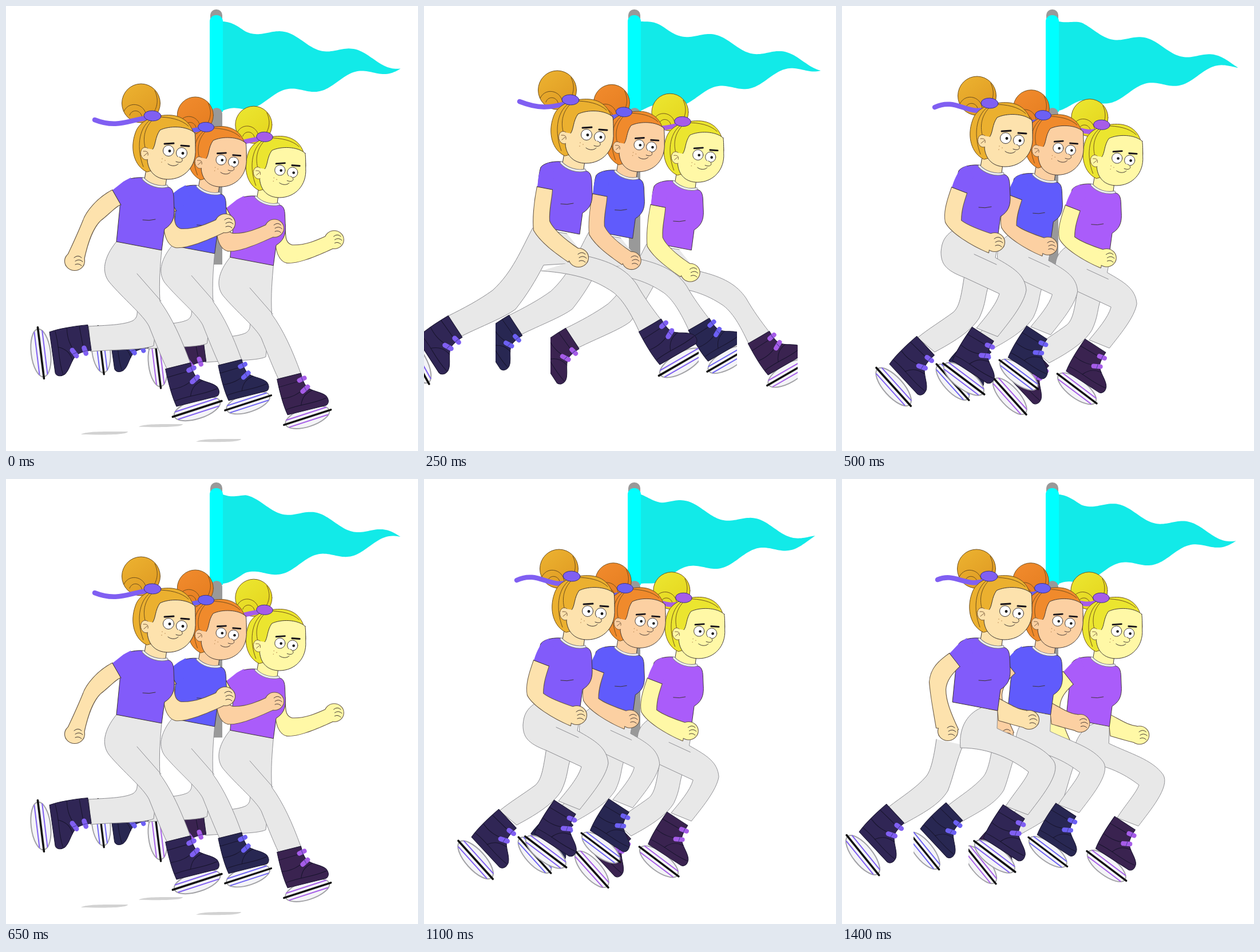
Recreate the animation shown at these times as an HTML page with a canvas. Size 720 px wide and 778 px high, loop 1450 ms.

```html
<!DOCTYPE html>
<html>
<head>
<meta charset="utf-8">
<style>
html, body { margin: 0; width: 100%; height: 100%; overflow: hidden; background: #fff; }
canvas { display: block; }
</style>
</head>
<body>
<canvas id="stage" width="720" height="778"></canvas>
<script>
const ctx = document.getElementById('stage').getContext('2d');
const LOOP = 1450, TICK = 50, TAU = Math.PI * 2;
const INK = '#3b3330', GREY = '#8c8c90', PANTS = '#e8e8e8';

// Legs: path plus boot [heel x, heel y, degrees, skate drop, skate tilt]
const contact = {
  back: 'M145 560C175 558 205 558 222 550C229 545 230 540 229 528L262 560L258 594C240 602 190 600 148 604Z',
  backBoot: [76, 570, 82, 4, 1],
  front: 'M193 412C170 440 167 465 180 482C205 512 240 540 250 560C262 590 272 615 281 634L322 624C306 580 290 545 269 516C267 480 270 450 272 427Z',
  frontBoot: [298, 700, -14, -3, -4],
  crease: 'M229 468L271 516', shadow: true
};
const push = {
  back: 'M165 455C160 490 155 510 147 520C130 540 105 555 82 573L108 603C140 585 170 570 185 545C195 520 200 490 212 465',
  backBoot: [30, 617, 47, 7, 4],
  front: 'M272 406L271 436C310 455 350 465 370 493C384 515 345 560 325 587L286 572C300 550 322 525 326 512C300 492 260 470 207 470C204 440 215 412 243 400',
  frontBoot: [247, 628, 33, 0, 4]
};
const leap = {
  back: 'M250 398L190 388C170 425 155 465 120 497C95 515 70 528 42 542L66 577C100 560 140 545 160 530C180 505 195 480 209 453L290 448',
  backBoot: [-13, 581, 57, 6, 4],
  front: 'M288 438C330 448 355 462 372 487C385 510 400 530 413 547L377 571C365 545 350 515 330 500C300 480 270 468 205 463',
  frontBoot: [412, 627, -30, 0, 0]
};
const pass = {
  back: 'M214 470C208 510 205 525 195 535C175 550 150 565 132 580L162 605C190 590 225 570 240 545C252 520 250 505 256 490Z',
  backBoot: [83, 626, 47, 6, 1],
  front: 'M193 393C180 402 174 412 173 430C173 450 180 462 215 475L275 503C270 522 250 545 235 563L272 578C290 555 318 522 322 497C320 470 300 458 268 440L275 403Z',
  frontBoot: [193, 620, 33, 0, 4],
  crease: 'M231 434L270 452'
};

// Arms: outline, fist centre; sleeves: cuff edge plus the rest
const armBack = { path: 'M186 322C160 335 140 360 135 375C125 400 113 425 106 440L136 444C145 402 155 385 165 375C178 365 192 350 200 347Z', fist: [120, 446] };
const armFront = { path: 'M293 352C294 372 292 386 306 390C330 391 350 382 370 373L380 396C345 412 315 424 296 422C282 418 277 400 276 385Z', fist: [383, 380] };
const armLow = { path: 'M188 305C170 318 155 330 153 355C155 380 160 405 165 435L203 438C190 410 181 388 181 368C182 352 192 340 206 327Z', fist: [185, 441] };
const armLowFar = { path: 'M270 382C295 395 305 403 322 405L322 435C300 430 285 425 274 422Z', fist: [327, 421] };
const slant = ['M186 322L201 348', 'L228 328L218 300L205 307Z'];
const slantUp = ['M188 305L206 328', 'L230 308L218 278L205 287Z'];

const POSES = [
  { legs: contact, head: [0, 0], bun: [0, 0], near: armBack, far: armFront, sleeve: slant,
    ribbon: 'M246 196C218 198 195 215 155 199' },
  { legs: push, head: [1, -22], bun: [-2, 9], near: armLow, far: armLowFar, sleeve: slantUp,
    ribbon: 'M250 178C215 190 198 163 167 176' },
  { legs: leap, head: [0, -28], bun: [-3, 5],
    near: { path: 'M198 316C192 345 190 375 192 392C205 415 235 435 252 447L269 424C245 408 225 390 219 376C218 355 223 338 224 321Z', fist: [270, 440] },
    sleeve: ['M198 316L224 321', 'L228 292L218 274L208 279C199 290 200 305 198 316Z'],
    ribbon: 'M246 171C220 178 200 180 167 167' },
  { legs: contact, head: [0, 0], bun: [0, 0], farBack: armBack,
    near: { path: 'M206 345C209 375 215 395 226 408C250 425 320 415 364 399L358 376C325 388 270 392 252 385C242 375 238 355 238 342Z', fist: [371, 385] },
    sleeve: ['M206 348L238 344', 'L236 315L218 301L207 307C200 320 202 336 206 348Z'],
    ribbon: 'M246 196C218 198 195 215 155 199' },
  { legs: pass, head: [2, -22], bun: [-2, 9],
    near: { path: 'M192 317C182 345 178 362 181 378C190 396 225 418 256 431L262 399C238 391 218 383 208 375C208 355 214 340 218 327Z', fist: [267, 413] },
    sleeve: ['M192 317L218 327', 'L230 298L218 279L207 285C198 298 194 310 192 317Z'],
    ribbon: 'M250 181C218 190 198 160 162 177' },
  { legs: leap, head: [0, -28], bun: [-3, 5], near: armLow, far: armLowFar, sleeve: slantUp,
    ribbon: 'M246 171C220 178 200 180 167 167' }
];

const RUNNERS = [
  { at: [207, 45], scale: .957, clip: [221, 653], skin: '#fff8a6', hair: '#ebe52f', bun: '#e5d51d', shirt: '#aa5cfa', lace: '#a65ce8', boot: '#3a2350' },
  { at: [108.7, 31], scale: .941, clip: [125, 547], skin: '#fcd0a2', hair: '#f08a2c', bun: '#e57d20', shirt: '#605bfc', lace: '#6c60f4', boot: '#282752' },
  { at: [0, 0], scale: 1, clip: [0, 480], skin: '#fde2ad', hair: '#ebb02f', bun: '#df9a22', shirt: '#825bfa', lace: '#805ff2', boot: '#302655' }
];

const asPath = p => typeof p === 'string' ? new Path2D(p) : p;

function line(p, color = INK, width = 1) {
  ctx.strokeStyle = color;
  ctx.lineWidth = width;
  ctx.stroke(asPath(p));
}

function shape(p, fill, edge = INK, width = 1) {
  p = asPath(p);
  ctx.fillStyle = fill;
  ctx.fill(p);
  if (edge) line(p, edge, width);
}

function oval(x, y, rx, ry = rx, turn = 0) {
  const p = new Path2D();
  p.ellipse(x, y, rx, ry, turn, 0, TAU);
  return p;
}

function placed([x, y], draw, degrees = 0) {
  ctx.save();
  ctx.translate(x, y);
  ctx.rotate(degrees * Math.PI / 180);
  draw();
  ctx.restore();
}

function skate(look) {
  shape(oval(0, 0, 42, 17), '#f4f4f7', '#a2a2a6', 2);
  line('M-38 -7L38 -7M-37 7L37 7', look.lace, 2);
  line('M-45 0L45 0', '#111', 3.6);
}

function boot([x, y, angle, drop, tilt], look) {
  placed([x, y], () => {
    placed([34, 16 + drop], () => skate(look), tilt);
    shape('M-3 -68L42 -68C42 -50 44 -42 50 -37C58 -29 72 -25 77 -16C81 -7 77 -1 72 0L0 0C-4 -20 -4 -45 -3 -68Z', look.boot, '#191530');
    line('M-3 -53L42 -55M-2 -31C15 -29 28 -32 44 -41M0 -10C30 -14 45 -8 76 -13M28 -11C34 -27 44 -31 55 -33', '#17142c');
    line('M36 -56L46 -58M37 -35L48 -41', look.lace, 8.5);
    line('M41 -61L42 -53M42 -42L44 -34', '#49409a');
  }, angle);
}

function arm({ path, fist: [x, y] }, skin) {
  const whole = [asPath(path), oval(x, y, 17, 16)];
  whole.forEach(p => line(p, '#655645', 2.2));
  whole.forEach(p => shape(p, skin, null));
  line(`M${x - 1} ${y - 6}q7 -6 13 0M${x + 1} ${y}q7 -5 13 1M${x + 1} ${y + 6}q6 -3 11 2`);
}

function head(pose, look) {
  placed(pose.bun, () => {
    const tone = ctx.createLinearGradient(215, 140, 260, 200);
    tone.addColorStop(0, look.hair);
    tone.addColorStop(1, look.bun);
    shape(oval(236, 170, 33.5, 34), tone, '#6d4d1c');
    line('M206 184C216 163 247 172 245 196M216 191C220 179 237 181 238 196M260 148C268 164 264 180 255 190', '#6d4d1c');
  });
  ctx.save();
  ctx.translate(-pose.head[0], -pose.head[1]);
  line(pose.ribbon, look.lace, 8.5);
  ctx.restore();
  shape('M246 290C224 280 216 250 226 222C233 199 262 189 290 191C316 194 331 213 331 246L280 280Z', look.hair, '#6d4d1c');
  line('M252 199C231 215 228 250 240 281M258 197C242 212 239 230 243 247M264 194C286 194 306 198 319 210', '#6d4d1c');
  shape(oval(256, 192, 15, 9, .05), look.lace, '#39327e');
  shape('M330 222C316 209 285 209 269 217C260 230 262 243 256 251L247 270C249 290 262 303 283 303C312 303 333 280 331 250C331 238 331 228 330 222Z', look.skin);
  shape(oval(244, 258, 8.5, 11, -.2), look.skin, '#76583a');
  shape('M247 249L258 251L255 271L248 270Z', look.skin, null);
  line('M240 254C247 253 249 256 248 261M241 262L247 257', '#76583a');
  [[284, 253], [307, 257]].forEach(([x, y]) => {
    shape(oval(x, y, 9.5), '#fff');
    shape(oval(x + 2, y + .5, 2.4), '#151515', null);
  });
  line('M277 241L293 240M306 244L320 245', '#17141a', 3);
  shape('M298 264C312 263 311 276 298 272', look.skin, null);
  line('M303 264C312 267 309 277 297 272M283 276C289 281 298 280 301 276');
  [[273, 267], [278, 270], [272, 273]].forEach(([x, y]) => shape(oval(x, y, .8), '#b88a53', null));
}

function runner(look, pose) {
  const { legs } = pose, [left, right] = look.clip;
  const rise = [0, pose.head[1]];
  ctx.save();
  ctx.beginPath();
  ctx.rect(left, 0, right - left, 778);
  ctx.clip();
  ctx.translate(...look.at);
  ctx.scale(look.scale, look.scale);

  if (legs.shadow) shape('M131 749C140 743 175 744 213 744C212 750 170 750 131 749Z', '#d2d2d2', null);
  shape(legs.back, PANTS, GREY);
  boot(legs.backBoot, look);
  if (pose.farBack) arm(pose.farBack, look.skin);
  shape(legs.front, PANTS, GREY);
  if (legs.crease) line(legs.crease, GREY);
  boot(legs.frontBoot, look);
  if (pose.far) arm(pose.far, look.skin);

  placed(rise, () => {
    shape('M238 300C222 299 208 304 204 310C199 325 200 348 198 362L193 412L272 427L277 390C290 382 294 372 294 358L293 333C292 320 288 317 281 316Z', look.shirt);
    line('M239 374Q250 376 261 373');
  });
  // Raised legs lift the low arm along with the body
  placed([0, legs === leap && pose.far ? -6 : 0], () => {
    const [cuff, rest] = pose.sleeve;
    arm(pose.near, look.skin);
    shape(cuff + rest, look.shirt, null);
    line(cuff);
  });
  placed(rise, () => {
    shape('M246 280L242 303C252 313 268 316 279 314L281 298Z', look.skin);
    line('M240 302C250 313 267 318 281 315', '#77777c', 5);
    line('M240 302C250 313 267 318 281 315', '#ececf0', 3.2);
  });
  placed(pose.head, () => head(pose, look));
  ctx.restore();
}

function flag(t) {
  const root = 379, wave = 122;
  const tip = 688.5 + 4.5 * Math.cos(TAU * (t - 330) / LOOP);
  const edge = (x, start, slope, size) => {
    const u = (x - root) / (tip - root);
    const phase = 4.11 + TAU * ((x - 477) / wave - t / LOOP);
    return start + slope * u + size * Math.min(1, (x - root) / 40) * Math.sin(phase);
  };
  const steps = 110, xAt = i => root + (tip - root) * i / steps;
  ctx.beginPath();
  for (let i = 0; i <= steps; i++) ctx.lineTo(xAt(i), edge(xAt(i), 27, 77, 8.8));
  for (let i = steps; i >= 0; i--) ctx.lineTo(xAt(i), edge(xAt(i), 183, -79, 9.2));
  ctx.fillStyle = '#12eae8';
  ctx.fill();
}

function bar(x, y, w, h, radii, color) {
  ctx.beginPath();
  ctx.roundRect(x, y, w, h, radii);
  ctx.fillStyle = color;
  ctx.fill();
}

function draw(t) {
  ctx.fillStyle = '#fff';
  ctx.fillRect(0, 0, 720, 778);
  ctx.lineCap = ctx.lineJoin = 'round';
  bar(357, 6, 21, 60, [10, 10, 0, 0], '#999');
  flag(t);
  bar(356, 16, 23, 169, [11, 11, 0, 0], '#0ff');
  bar(358, 178, 20, 274, [10, 10, 0, 0], '#999');
  const pose = POSES[Math.floor(Math.max(0, t - TICK) / 100) % POSES.length];
  RUNNERS.forEach(look => runner(look, pose));
}

const start = performance.now();
function frame() {
  const t = (performance.now() - start) % LOOP;
  draw(Math.floor(t / TICK) * TICK);
  requestAnimationFrame(frame);
}
frame();
</script>
</body>
</html>
```
